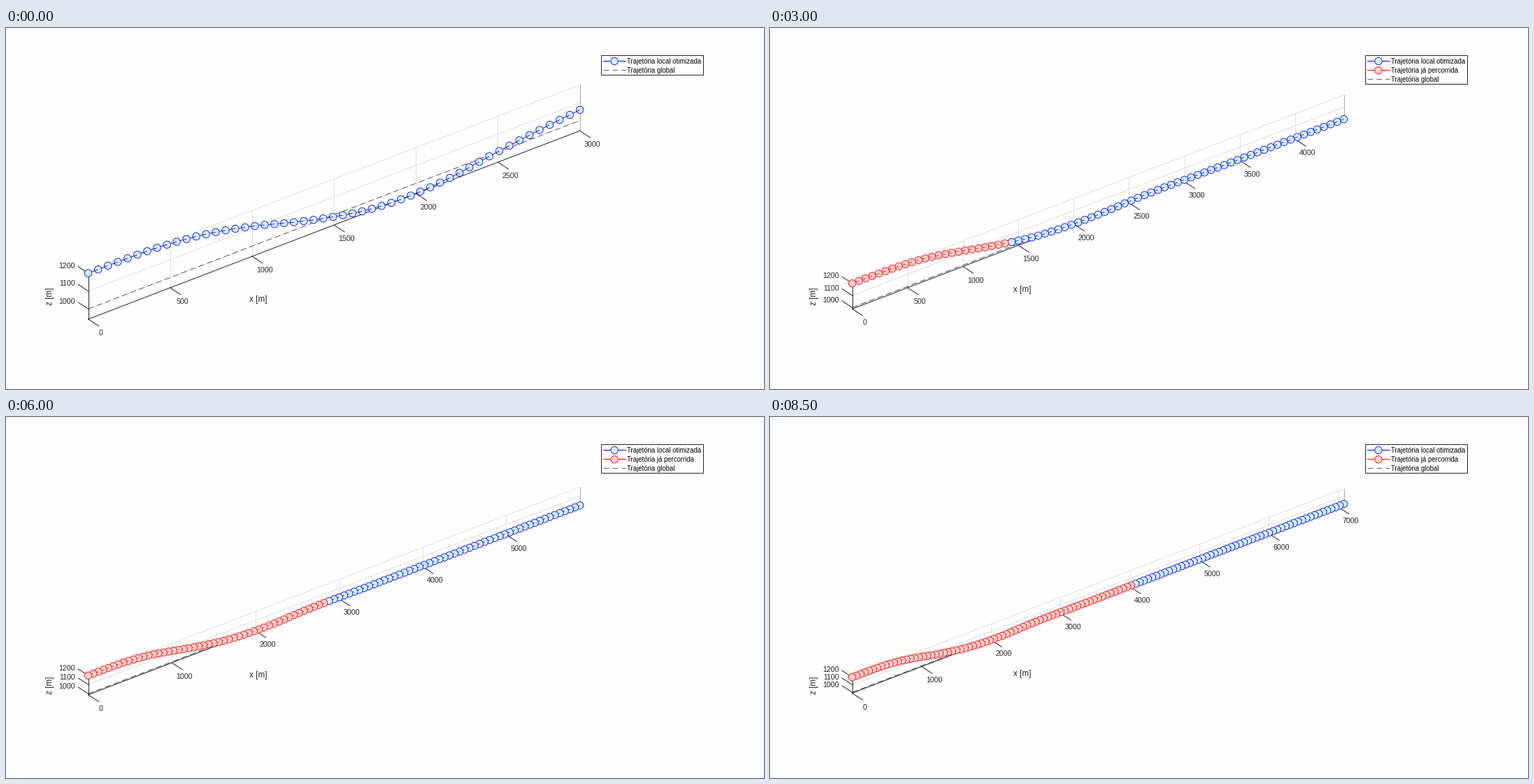
Recreate the animation shown at these times as a matplotlib script. Size 1084 by 517 pixels, loop 9 s.

```python
import numpy as np
import matplotlib.pyplot as plt
from matplotlib.animation import FuncAnimation
from matplotlib.collections import PathCollection
from matplotlib.patches import Rectangle
from matplotlib.path import Path

W, H = 1084, 517
PX = 0.72                      # points per pixel at 100 dpi
STEPS, STEP_MS = 18, 500
HORIZON, SHIFT, SPACING = 50, 4, 60
RADIUS = 5.2

# Oblique view: azimuth -37.5, elevation 30, equal data aspect
AZ, EL = np.radians(37.5), np.radians(30)
SLOPE = np.tan(AZ) * np.sin(EL)
Z_RATIO = np.cos(EL) / np.cos(AZ)
LEFT, SPAN, MID_Y = 118, 703, 249.2
Z_TOP, Z_GOAL = 1200, 1000

BLUE, BLUE_FILL = "#0000ff", "#d4f4ff"
RED, RED_FILL = "#ff0000", "#ffd2ce"
INK, GRID, EDGE = "#262626", "#dfdfdf", "#a6a6a6"

# Height (m) at a few path points for the first plan and the settled one
FIRST = ([0, 4, 8, 12, 17, 21, 25, 29, 31, 33, 37, 41, 46, 50],
         [1200, 1199, 1191, 1166, 1107, 1044, 990, 952, 944, 943, 958, 994,
          1034, 1060])
SETTLED = ([0, 4, 8, 12, 16, 20, 24, 27, 30, 34, 38, 42, 46, 50, 56, 62, 130],
           [1200, 1198, 1191, 1167, 1126, 1078, 1037, 1012, 997, 989, 991,
            1001, 1005, 1004, 1000, 1000, 1000])
DIP = {1: 15, 2: 9, 3: 2}      # extra sag of the early re-plans

plt.rcParams["font.family"] = "Liberation Sans"
fig = plt.figure(figsize=(W / 100, H / 100), dpi=100, facecolor="#fefefe")
ax = fig.add_axes([0, 0, 1, 1])


def smooth(points, x):
    """Cubic Hermite curve through the points."""
    px, py = (np.array(p, float) for p in points)
    m = np.gradient(py, px)
    i = np.clip(np.searchsorted(px, x, side="right") - 1, 0, len(px) - 2)
    h = px[i + 1] - px[i]
    t = (x - px[i]) / h
    return ((1 + 2 * t) * (1 - t) ** 2 * py[i] + t * (1 - t) ** 2 * h * m[i]
            + t * t * (3 - 2 * t) * py[i + 1] + t * t * (t - 1) * h * m[i + 1])


def path(step):
    i = np.arange(HORIZON + SHIFT * step + 1)
    x = i * float(SPACING)
    if step == 0:
        x += np.interp(i, [0, 8, 25, 34, 40, 50], [0, 0, -6, -13, -14, 0])
        return x, smooth(FIRST, i)
    sag = np.exp(-((i - 33) / 7) ** 2) + 0.5 * np.exp(-((i - 57) / 5) ** 2)
    return x, smooth(SETTLED, i) - DIP.get(step, 0) * sag


def line(xs, ys, color, width=1.0, **kw):
    ax.plot(xs, ys, color=color, lw=width * PX, **kw)


def dashed(xs, ys):
    w = 0.7
    line(xs, ys, INK, w, linestyle=(0, (8 / w, 5 / w)),
         dash_capstyle="butt")


def chain(xs, ys, color, fill):
    """Linked circles, painted from the far end to the near one."""
    dots = list(zip(xs, ys))
    shapes = []
    for i in reversed(range(len(dots))):
        if i + 1 < len(dots):
            shapes.append(Path([dots[i], dots[i + 1]]))
        shapes.append(Path.circle(dots[i], RADIUS))
    ax.add_collection(PathCollection(shapes, facecolor=fill, edgecolor=color,
                                      linewidth=0.85 * PX, zorder=3),
                      autolim=False)


def label(x, y, s, size=10.67, ha="center", va="center", color=INK, **kw):
    ax.text(x, y, s, fontsize=size * PX, ha=ha, va=va, color=color, **kw)


def draw_legend(step):
    rows = [("Trajetória local otimizada", BLUE, BLUE_FILL)]
    if step:
        rows.append(("Trajetória já percorrida", RED, RED_FILL))
    rows.append(("Trajetória global", None, None))
    ax.add_patch(Rectangle((851, 39), 146, 28 if step == 0 else 41,
                           facecolor="white", edgecolor=INK, lw=PX, zorder=2))
    for n, (name, color, fill) in enumerate(rows):
        y = 47 + 13.2 * n
        if color:
            line([854, 886], [y, y], color)
            chain([870], [y], color, fill)
        else:
            dashed([854, 886], [y, y])
        label(888, y + 3.6, name, 9.6, "left", "baseline", "black")


def draw(step):
    ax.clear()
    ax.set_xlim(0.4, W + 0.4)
    ax.set_ylim(H, 0)
    ax.axis("off")

    x, z = path(step)
    length = SPACING * (HORIZON + SHIFT * step)
    z_min = z.min()
    scale = SPAN / length

    def project(px, pz):
        px, pz = np.broadcast_arrays(np.asarray(px, float),
                                     np.asarray(pz, float))
        u = px * scale
        rise = (pz - (Z_TOP + z_min) / 2) * scale * Z_RATIO
        return LEFT + u, MID_Y + (SPAN / 2 - u) * SLOPE - rise

    ends = [0, length]
    ticks = np.arange(0, length + 1, 500 if length < 5600 else 1000)

    # Back wall
    for t in ticks[1:]:
        line(*project([t, t], [z_min, Z_TOP]), GRID)
    for level in (1000, 1100, 1200):
        line(*project(ends, level), GRID)
    line(*project([length] * 2, [z_min, Z_TOP]), EDGE)

    # Axes, ticks and labels
    line(*project(ends, z_min), INK)
    line(*project([0, 0], [z_min, Z_TOP]), INK)
    for t in ticks:
        a, b = project(t, z_min)
        line([a, a + 15], [b, b + 9.8], INK)
        label(a + 18, b + 20, str(t))
    for level in (1000, 1100, 1200):
        a, b = project(0, level)
        line([a, a - 14.5], [b, b - 9.5], INK)
        label(99.5, b - 10.5, str(level), ha="right")
    label(361, project(0, z_min)[1] - 27.5, "x [m]", 11.73)
    label(63, 384, "z [m]", 11.73, rotation=90)

    # Trajectories
    now = SHIFT * step
    u, v = project(x, z)
    dashed(*project(ends, Z_GOAL))
    chain(u[now:], v[now:], BLUE, BLUE_FILL)
    if now:
        chain(u[:now], v[:now], RED, RED_FILL)
    draw_legend(step)
    return []


anim = FuncAnimation(fig, draw, frames=STEPS, interval=STEP_MS,
                     init_func=lambda: draw(0), repeat=True, repeat_delay=0)
plt.show()
```
